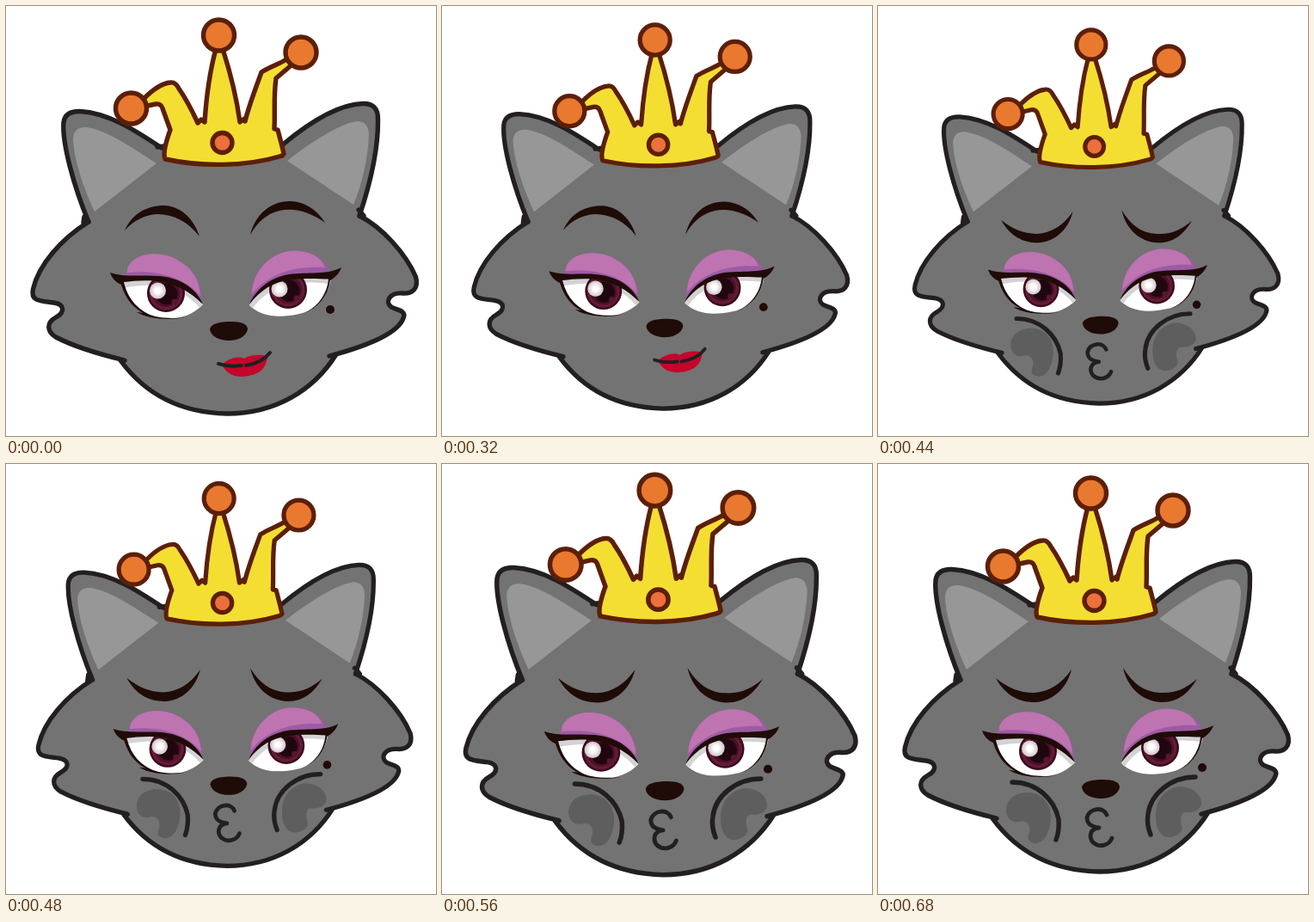
Write an HTML page that moves like this. It is 500x500 px and loops after 1000 ms.

```html
<!DOCTYPE html>
<html lang="en">
<head>
<meta charset="utf-8">
<title>Crowned wolf blowing a kiss</title>
<style>
  html, body { margin: 0; width: 100%; height: 100%; overflow: hidden; background: #fff; }
  svg { display: block; width: 100vw; height: 100vh; }
  .line { fill: none; stroke: #231f20; stroke-width: 5.4; stroke-linecap: round; stroke-linejoin: round; }
  .dark { fill: #1f0b07; }
  .inner { fill: #979797; }
  .patch { fill: #5e5e5e; }
  .lid { fill: #bd74b1; }
  .fold { fill: #9d5ba4; }
  .shade { fill: none; stroke: #d4d2d5; stroke-width: 7; }
  .crown { fill: #f4de32; stroke: #5c1f08; stroke-width: 5.4; stroke-linejoin: round; }
  .ball { fill: #e9792f; }
</style>
</head>
<body>
<svg viewBox="0 0 500 500">
  <defs>
    <radialGradient id="glint">
      <stop offset=".3" stop-color="#fff"/>
      <stop offset="1" stop-color="#cfc3c8"/>
    </radialGradient>
    <g id="iris">
      <circle r="22" fill="#3a0a1d"/>
      <circle r="19.5" fill="#641b38"/>
      <circle r="16" fill="#4c1029"/>
      <circle cx="1" cy="1" r="12.5" fill="#20070f"/>
      <circle cx="10" cy="10" r="3.5" fill="#571730"/>
    </g>
    <clipPath id="leftEye"><path d="M134 319C155 313 180 314 200 322Q220 331 229 347C217 360 200 364 187 363.500C163 362 143 347 134 319Z"/></clipPath>
    <clipPath id="rightEye"><path d="M283 348C292 329 308 316 330 313C348 312 363 313 378 316C375 337 361 354 341 358C318 363 297 362 283 348Z"/></clipPath>
  </defs>

  <g id="head">
    <!-- fur -->
    <path class="line" style="fill:#737373" d="M96 251C79 210 65 160 67 135Q69 122 86 122.500C119 124 151 145 181 165L322 161C346 141 382 114.500 415 113.500Q433 113 432.500 132C433 167 422 211 411 244C437 257 465 288 476.500 315C480 328 473 335 461 334C446 333 440 344 448 350C455 354 466 354 462 363C456 380 421 395 376 407L384 405C357 448 312 474 257 474C205 473 163 453 133 412L138 412C105 404 75 394 58 385C47 378 47 368 58 362C69 356 68 347 56 345C41 343 28 344 31.500 329C38 301 64 271 96 251Z"/>
    <path class="line" d="M91 245L90 252L96 251M410 237L416 244L411 244M176 164L184 163"/>
    <path class="inner" d="M103 239C90 211 79 179 78 154Q79 140 94 141C119 145 150 167 175 183Z"/>
    <path class="inner" d="M327 180C351 161 385 138 408 134Q421 134 422 149C421 177 414 207 404 231Z"/>

    <!-- crown -->
    <path class="crown" d="M185 178C182 171 187 155 191 144L182 119Q180 113 174 114L160 117L161 107C169 99 181 90 191 89Q197 88 201 96C210 109 217 123 223 136L227 132L231 135C233 105 237 76 244 50H252C261 78 268 106 272 135L277 131L278 134C283 114 291 94 297 77C308 70 317 68 328 61L334 67L314 84C311 105 313 123 312 143L316 144C318 152 321 162 323 172Q322 174 318 175C278 187 226 187 185 178Z"/>
    <g class="crown ball">
      <circle class="ball" cx="247.500" cy="34" r="18"/>
      <circle class="ball" cx="145.500" cy="119" r="18"/>
      <circle class="ball" cx="343" cy="54" r="18"/>
      <circle cx="251.500" cy="159" r="11.500" fill="#ec703c"/>
    </g>

    <!-- left eye -->
    <path class="fold" d="M138 314C145 291 170 284 193 292C216 302 228 319 227 343C208 325 178 315 138 316Z"/>
    <path class="lid" d="M141 306C146 289 172 284 193 292C215 302 225 317 226 337C209 317 179 306 141 310Z"/>
    <g clip-path="url(#leftEye)">
      <path fill="#fff" d="M120 300H240V370H120Z"/>
      <path class="shade" d="M134 325C165 318 203 318 229 350"/>
      <use href="#iris" x="186" y="334"/>
      <circle cx="176.500" cy="331" r="9.500" fill="url(#glint)"/>
    </g>
    <path class="dark" d="M121 310C138 316 158 312 179 314C206 317 222 330 229 347C214 332 199 324 180 320.500C163 318 148 320 137 321C142 342 155 356 175 362C153 358 140 344 134 324C127 321 123 316 121 310Z"/>
    <path class="dark" d="M152 356C165 364 190 366 208 362C192 364 174 363 161 357Z"/>

    <!-- right eye -->
    <path class="fold" d="M285 341C284 316 301 289 329 285C350 283 370 291 376 308L374 313C338 308 305 316 285 341Z"/>
    <path class="lid" d="M286 335C286 313 303 289 329 285C349 283 366 290 371 304C334 302 306 311 286 335Z"/>
    <g clip-path="url(#rightEye)">
      <path fill="#fff" d="M275 300H390V370H275Z"/>
      <path class="shade" d="M283 351C305 317 345 315 380 320"/>
      <use href="#iris" x="328" y="330"/>
      <circle cx="318" cy="329" r="9.500" fill="url(#glint)"/>
    </g>
    <path class="dark" d="M390 304C374 313 350 309 329 312C306 316 290 330 283 347C296 330 311 321 330 318.500C348 316 363 317 375 317.500C373 337 361 351 345 358C363 351 374 338 377 319C384 315 388 310 390 304Z"/>
    <circle class="dark" cx="377" cy="353" r="5"/>

    <path class="dark" d="M237 376C238 369 249 367 262 367C274 367 281 370 281 376C279 385 269 389 259 389C248 389 238 384 237 376Z"/>

    <g id="smile">
      <path class="dark" d="M138 261C147 241 164 232 184 232C205 233 219 249 225 268C212 251 195 242 176 242C161 243 149 249 138 261Z"/>
      <path class="dark" d="M284 266C290 241 310 226 331 227C350 228 363 239 371 252C354 240 336 234 318 238C302 242 292 252 284 266Z"/>
      <path fill="#c4062b" d="M251 417C257 411 269 406 277 410C284 405 296 405 304 407C303 421 295 430 274 431C262 431 255 425 251 417Z"/>
      <path class="line" style="stroke-width:4" d="M247 416Q260 420 274 418M279 418Q298 415 307 403"/>
    </g>

    <g id="kiss">
      <path class="dark" d="M137 249C148 269 164 277 182 277C205 276 220 259 225 239C213 256 199 265 181 266C164 266 151 260 137 249Z"/>
      <path class="dark" d="M285 237C290 260 307 276 330 277C350 277 362 265 371 250C358 261 346 267 328 266C309 265 296 255 285 237Z"/>
      <path class="patch" d="M149 405C148 389 160 382 175 382C192 383 202 396 201 413C200 427 194 441 183 441C174 440 173 436 176 428C178 419 172 413 163 416C155 417 150 412 149 405Z"/>
      <path class="patch" d="M323 410C322 392 334 376 352 375C368 376 377 386 376 396C374 403 366 406 357 405C350 407 352 417 354 424C352 432 340 436 333 433C325 428 323 420 323 410Z"/>
      <path class="line" d="M156 370C185 370 205 390 210 413Q211 427 207 437M369 364C340 364 317 384 314 407Q312 419 317 431"/>
      <path class="line" style="stroke-width:4.800" d="M266 408C262 398 246 400 243 411C243 420 250 422 257 423C246 424 245 434 250 440C258 447 269 443 272 435"/>
    </g>
  </g>
</svg>
<script>
  const [head, smile, kiss] = ["head", "smile", "kiss"].map(id => document.getElementById(id));
  const LOOP = 1000, STEP = 40, START = 240, SWITCH = 440;
  // head size on each step: squash, overshoot, settle
  const sizes = [1, .987, .974, .961, .948, .948, .971, .993, 1.016, 1.012, 1.006, 1];

  function draw(now) {
    const t = now % LOOP;
    const step = Math.floor((t - START) / STEP);
    const size = sizes[Math.max(0, Math.min(step, sizes.length - 1))];
    head.setAttribute("transform", `translate(254 244.5) scale(${size}) translate(-254 -244.5)`);
    const kissing = t >= SWITCH;
    smile.style.display = kissing ? "none" : "";
    kiss.style.display = kissing ? "" : "none";
  }

  let start;
  function tick(now) {
    start ??= now;
    draw(now - start);
    requestAnimationFrame(tick);
  }
  draw(0);
  requestAnimationFrame(tick);
</script>
</body>
</html>
```
